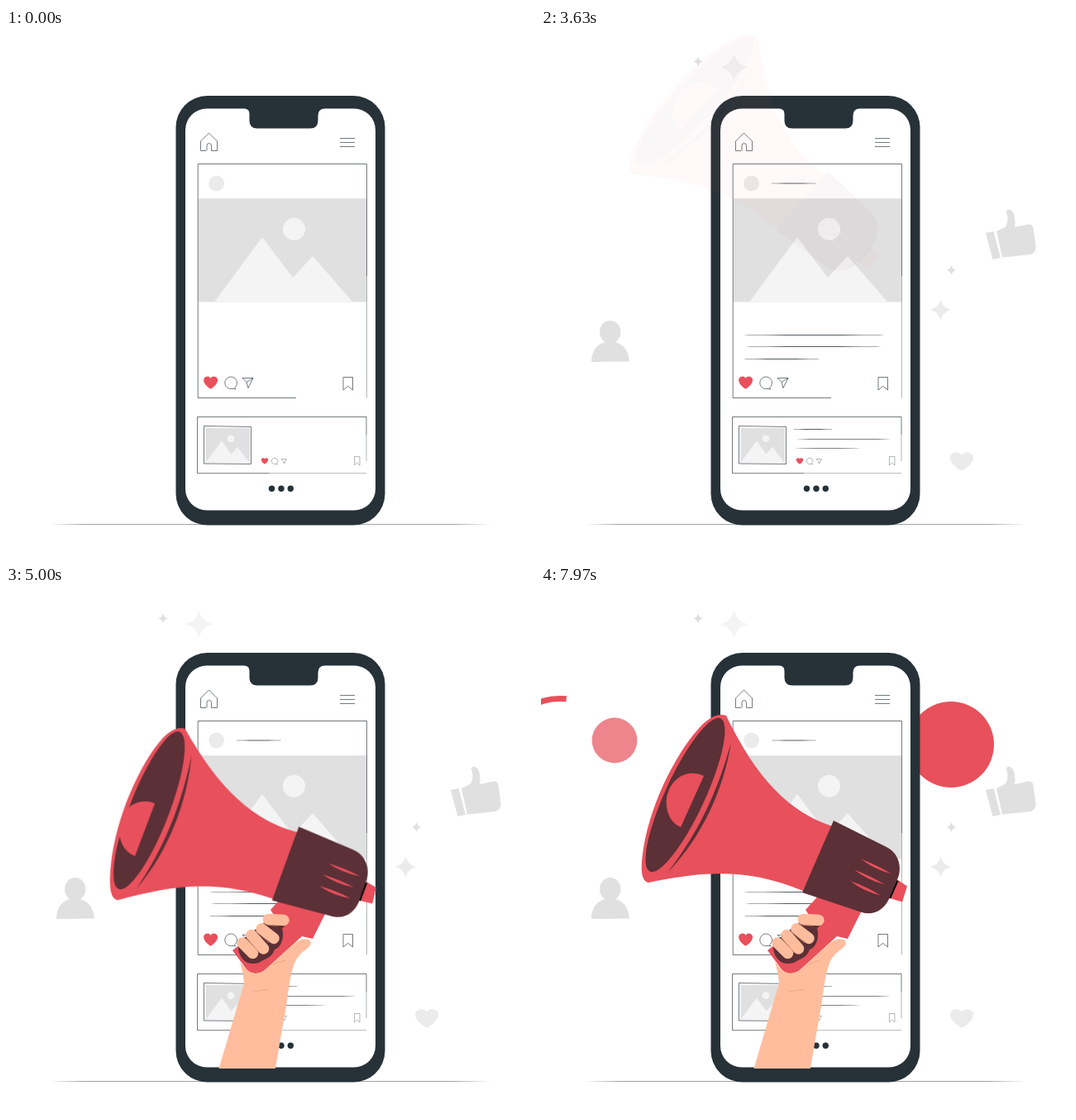
An HTML page that plays this animation: 640x640 px, repeating every 8 s.

```html
<!DOCTYPE html>
<html lang="en">
<head>
<meta charset="utf-8">
<title>Social media marketing</title>
<style>
  html, body { margin: 0; width: 100%; height: 100%; overflow: hidden; background: #fff; }
  svg { display: block; width: 100vw; height: 100vh; }
  .ink { fill: #263238; }
  .red { fill: #e8505b; }
  .wine { fill: #5b3036; }
  .pale { fill: #f4f4f4; }
  .mid { fill: #ebebeb; }
  .grey { fill: #e0e0e0; }
  .skin { fill: #ffbd9d; }
  .thin { fill: none; stroke: #263238; stroke-width: .65; }
  .faint { stroke-width: .35; }
  .finger { stroke: #ffbd9d; stroke-width: 13.5; stroke-linecap: round; fill: none; }
  .crease { stroke: #e8946c; stroke-width: .6; fill: none; }
  #lines * { transform-box: fill-box; transform-origin: 100% 50%; }
  #mega { transform-origin: 335px 328.5px; }
</style>
</head>
<body>
<svg viewBox="0 0 640 640">
  <defs>
    <path id="heart" d="M0 8C-3 6-8.5 2-8.5-3A4.6 4.6 0 0 1 0-5A4.6 4.6 0 0 1 8.5-3C8.5 2 3 6 0 8Z"/>
    <path id="star" d="M0-1Q.2-.2 1 0Q.2 .2 0 1Q-.2 .2-1 0Q-.2-.2 0-1Z"/>
    <clipPath id="above"><path d="M0 0H640V584.500H0Z"/></clipPath>
  </defs>

  <path class="ink" opacity=".6" d="M53 600.6L95 600.2H540L586 600.6L540 601H95Z"/>

  <g id="icons">
    <g class="grey">
      <ellipse cx="83.7" cy="368" rx="12.6" ry="14"/>
      <path d="M61 404C61 388 71 379 83.500 379.500C97 379 106.500 389 106.800 403.500Z"/>
      <path d="M538 248L547.500 246L556 278L546.500 280Z"/>
      <path d="M551 246L562 240.500Q567 231 562.500 222Q566 217 570.500 222Q575 230 573 241L590 237.500Q594.500 237 595.500 242L598.500 263Q599.500 272 592 274L558 277.500Z"/>
      <use href="#star" transform="translate(190 40.500) scale(6)"/>
      <use href="#star" transform="translate(496.500 293) scale(6)"/>
    </g>
    <use href="#star" class="pale" transform="translate(233.500 47.500) scale(16.500)"/>
    <use href="#star" class="mid" transform="translate(483.500 341) scale(12.500)"/>
    <use href="#heart" class="mid" transform="translate(509 524) scale(1.650 1.500)"/>
  </g>

  <circle id="big" class="red" cx="496" cy="193" r="52"/>
  <circle id="small" class="red" cx="89" cy="188" r="27.400"/>

  <!-- phone -->
  <rect class="ink" x="205.500" y="82" width="253" height="519.500" rx="38"/>
  <path fill="#fff" d="M243 97.500H288Q294.500 97.500 294.500 104V112Q294.500 121.500 304 121.500H368Q377.500 121.500 377.500 112V106Q377.500 97.500 386 97.500H421A26 26 0 0 1 447 123.500V557.500A26 26 0 0 1 421 583.500H243A26 26 0 0 1 217 557.500V123.500A26 26 0 0 1 243 97.500Z"/>
  <path class="thin" d="M242 148.500H235.500V137L245.500 127L255.500 137V148.500H248.500V142.500Q248.500 139.500 245.700 139.500T243 142.500V148.500"/>
  <path class="thin" d="M404 133.500H422M404 138.500H422M404 143.500H422"/>

  <!-- main post -->
  <path class="grey" d="M232.500 206.200H436.500V331.500H232.500Z"/>
  <path class="pale" d="M252 331.500L310 253L347 302L371 276L419.500 331.500Z"/>
  <circle class="pale" cx="348.500" cy="243.300" r="13.500"/>
  <circle class="mid" cx="254.600" cy="188" r="9.400"/>
  <path class="thin" d="M351 447.500H232.200V164.500H436.500V300"/>
  <path class="thin faint" d="M436.500 300V447.500"/>
  <use href="#heart" class="red" transform="translate(247.600 428.700)"/>
  <g class="thin">
    <path d="M276.500 435.200A7.300 7.300 0 1 0 274 436.400L278 437Z"/>
    <path d="M286 423.500H299L293 435.500L291 428.500ZM291 428.500L299 423.500"/>
    <path d="M408 422.500H419.500V438L413.700 433.300L408 438Z"/>
  </g>

  <!-- second post -->
  <path class="thin" d="M318 538.700H231.500V470.500H436V492"/>
  <path class="thin faint" d="M436 492V524M318 538.700H436"/>
  <path class="grey" d="M241.500 484H295V525.500H241.500Z"/>
  <path class="pale" d="M242 525L261 499.500L272.500 515.500L280 507L294 525Z"/>
  <circle class="pale" cx="272" cy="496.800" r="4.300"/>
  <path class="thin" d="M239.500 481.500L296.500 482.500V527.500L239.500 527Z"/>
  <use href="#heart" class="red" transform="translate(313 523.800) scale(.5)"/>
  <g class="thin faint">
    <path d="M327.500 526.700A3.700 3.700 0 1 0 326.300 527.400L328.500 528Z"/>
    <path d="M333 521.500H339.500L336.500 527L335.500 524Z"/>
    <path d="M421.500 518.500H428V529L424.700 526L421.500 529Z"/>
  </g>
  <g class="ink">
    <circle cx="321.500" cy="557.300" r="3.700"/>
    <circle cx="333" cy="557.300" r="3.700"/>
    <circle cx="344.300" cy="557.300" r="3.700"/>
  </g>

  <g id="lines" class="ink" opacity=".8"></g>

  <path id="wave" fill="none" stroke="#e8505b" stroke-width="2" d="M2.200-20.900A21 21 0 0 0-13.500 16.100"/>

  <g clip-path="url(#above)">
    <g id="hand">
      <path class="red" d="M340 371L392 386L371 428L358 425L314 465C306 472 296 471 291 465L274 442L326 402L320 393Z"/>
      <path class="skin" d="M283 456L291 465.500Q301 474 313 466L345 437Q357 425.500 366 429Q372.500 433 364 440Q350 449 347 464C342 480 341 500 338 515L325 590H256L288 482Q287 468 283 456Z"/>
      <path class="wine" d="M281 440C283 454 293 461 306 457C313 452 322 451 325 441C334 438 337 424 334 416L340 409L318 404L282 432Z"/>
      <path class="finger" d="M317.500 404.500L336 405.500"/>
      <path class="finger" d="M309 416L324 427.500"/>
      <path class="finger" d="M297 423.500L311.500 440"/>
      <path class="finger" d="M286 433L298.500 445.500"/>
      <path class="crease" d="M311 409Q318 413 330 412M302 418L318 433M291 427L306 445M300 491.500Q309 491 318 489M322 459Q330 457 338 454"/>
    </g>
  </g>

  <g id="mega">
    <path class="red" d="M432 357L443 364.500L437 383.500L419 378Z"/>
    <path d="M428 356L432.500 358L423 379.500L418 377Z"/>
    <path class="red" d="M224 158C216 155 207 158 196 168C168 196 134 258 124 318C120 344 121 358 130 360C190 348 245 340 317 370L353 292C300 275 260 233 224 158Z"/>
    <ellipse class="wine" rx="102" ry="24" transform="translate(174.500 254) rotate(-65.200)"/>
    <path id="core" class="red" d="M197 231C176 221 156 235 152 257C150 274 157 288 169 293Z"/>
    <path class="wine" d="M230 190C222 245 195 305 153 348C190 300 214 250 230 190Z"/>
    <path class="wine" d="M354 285L418 317C432 324 437 340 432 354L421 380C414 394 402 400 388 396L316 372Z"/>
    <path class="red" d="M387 331.500Q403 344 424 349.500Q407 339 387 331.500ZM379 344.500Q395 357 416 362.500Q399 352 379 344.500ZM374 358Q390 370.500 411 375.500Q394 365 374 358Z"/>
  </g>
</svg>
<script>
const LOOP = 8000;
const $ = id => document.getElementById(id);

// rows: [ms, value, easing]; the first and last values are held to the ends
function play(el, prop, rows) {
  const first = rows[0], last = rows[rows.length - 1];
  const steps = [[0, first[1]], ...rows, [LOOP, last[1]]];
  el.animate(
    steps.map(([ms, v, easing = 'linear']) => ({ offset: ms / LOOP, [prop]: v, easing })),
    { duration: LOOP, iterations: Infinity }
  );
}

const fade = (el, from, to, end = 1) => play(el, 'opacity', [[from, 0], [to, end]]);
const shift = (x, y) => `translate(${x}px, ${y}px)`;

// text lines: left, right, y, start, end
[
  [278, 333.5, 188, 30, 330],
  [245, 416, 371.5, 300, 720],
  [247, 412, 385.5, 650, 1030],
  [245, 337.5, 400.5, 980, 1290],
  [305, 353, 485.5, 1290, 1560],
  [308, 424, 497.4, 1540, 2030],
  [307, 386, 508.3, 2020, 2400]
].forEach(([x0, x1, y, from, to]) => {
  const line = document.createElementNS('http://www.w3.org/2000/svg', 'ellipse');
  const attrs = { cx: (x0 + x1) / 2, cy: y, rx: (x1 - x0) / 2, ry: .42 };
  for (const k in attrs) line.setAttribute(k, attrs[k]);
  $('lines').append(line);
  play(line, 'transform', [[from, 'scaleX(0)'], [to, 'scaleX(1)']]);
});

fade($('icons'), 1250, 3500);

// megaphone drop and wobble: ms, x, y, degrees
const swing = [
  [3630, -19, -120, 17.7, 'cubic-bezier(.3,.4,.7,.9)'],
  [4270, -2, -20, 2.4],
  [4430, -1, -9, 1.1, 'ease-in-out'],
  [4720, 6, 17, -6.8, 'ease-in-out'],
  [5000, 3, 8.5, -3.6],
  [5290, 0, 1, -.4, 'ease-out'],
  [5450, -1, -8, 1.1, 'ease-in-out'],
  [5670, 0, 0, 0]
];
play($('mega'), 'transform',
  swing.map(([ms, x, y, r, ease]) => [ms, `${shift(x, y)} rotate(${r}deg)`, ease]));
play($('mega'), 'opacity', [[3590, 0], [3630, .04], [4100, 1]]);
play($('core'), 'transform', [
  [4450, shift(0, 0), 'ease-in-out'],
  [5000, shift(-15, 15), 'ease-in-out'],
  [5450, shift(0, 0)]
]);
play($('hand'), 'transform', [
  [3650, shift(0, 215), 'cubic-bezier(.5,1,.89,1)'],
  [4550, shift(0, 0)]
]);

play($('wave'), 'opacity', [[7110, 0, 'step-end'], [7111, 1]]);
play($('wave'), 'transform', [
  [7130, `${shift(148, 247)} scale(1)`],
  [7970, `${shift(23, 211)} scale(3.5)`]
]);
fade($('big'), 7180, 7700);
fade($('small'), 7600, 7970, .7);
</script>
</body>
</html>
```
